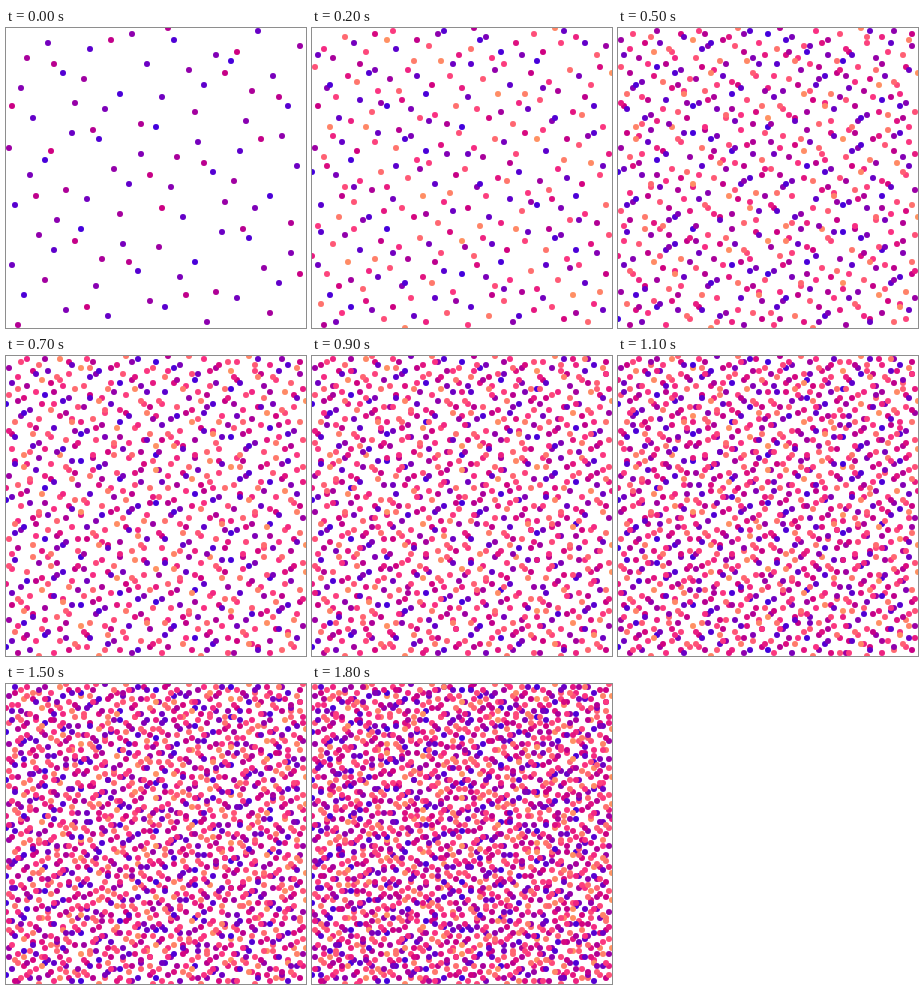
These frames come from a looping animation (300 by 300 pixels, 1900 ms). An HTML page with a canvas:

```html
<!DOCTYPE html>
<html>
<head>
<meta charset="utf-8">
<style>
  html, body { margin: 0; width: 100%; height: 100%; overflow: hidden; background: #fff; }
  canvas { display: block; }
</style>
</head>
<body>
<canvas id="stage" width="300" height="300"></canvas>
<script>
const ctx = document.getElementById('stage').getContext('2d');

const STEP_MS = 100;
const STEPS = 19;
const POINTS_PER_STEP = 100;
const COLOR_CYCLE = 256;
const GRID = 100;
const CELL = 3;
const RADIUS = 3;

// Colour ramp: position in the cycle, then red, green, blue
const RAMP = [
  [0, 66, 0, 222],
  [50, 136, 0, 178],
  [100, 208, 0, 128],
  [150, 250, 48, 130],
  [200, 255, 88, 118],
  [256, 255, 148, 98]
];

// Van der Corput radical inverse; bases 2 and 3 give the Halton sequence
function radicalInverse(index, base) {
  let result = 0;
  for (let scale = 1 / base; index > 0; scale /= base) {
    result += (index % base) * scale;
    index = Math.floor(index / base);
  }
  return result;
}

function rampColor(position) {
  const next = RAMP.findIndex(stop => stop[0] > position);
  const from = RAMP[next - 1], to = RAMP[next];
  const mix = (position - from[0]) / (to[0] - from[0]);
  const channel = c => Math.round(from[c] + (to[c] - from[c]) * mix);
  return `rgb(${channel(1)}, ${channel(2)}, ${channel(3)})`;
}

const snap = value => Math.round(value * GRID) * CELL;

const points = Array.from({ length: STEPS * POINTS_PER_STEP }, (_, k) => {
  const index = k + 1;
  return {
    x: snap(radicalInverse(index, 2)),
    y: snap(radicalInverse(index, 3)),
    color: rampColor(index % COLOR_CYCLE)
  };
});

function draw(step) {
  ctx.fillStyle = '#fff';
  ctx.fillRect(0, 0, 300, 300);
  for (const { x, y, color } of points.slice(0, (step + 1) * POINTS_PER_STEP)) {
    ctx.fillStyle = color;
    ctx.beginPath();
    ctx.arc(x, y, RADIUS, 0, Math.PI * 2);
    ctx.fill();
  }
}

const start = performance.now();
let shown = -1;

function tick() {
  const elapsed = Math.max(0, performance.now() - start);
  const step = Math.floor(elapsed / STEP_MS) % STEPS;
  if (step !== shown) draw(shown = step);
  requestAnimationFrame(tick);
}
tick();
</script>
</body>
</html>
```
